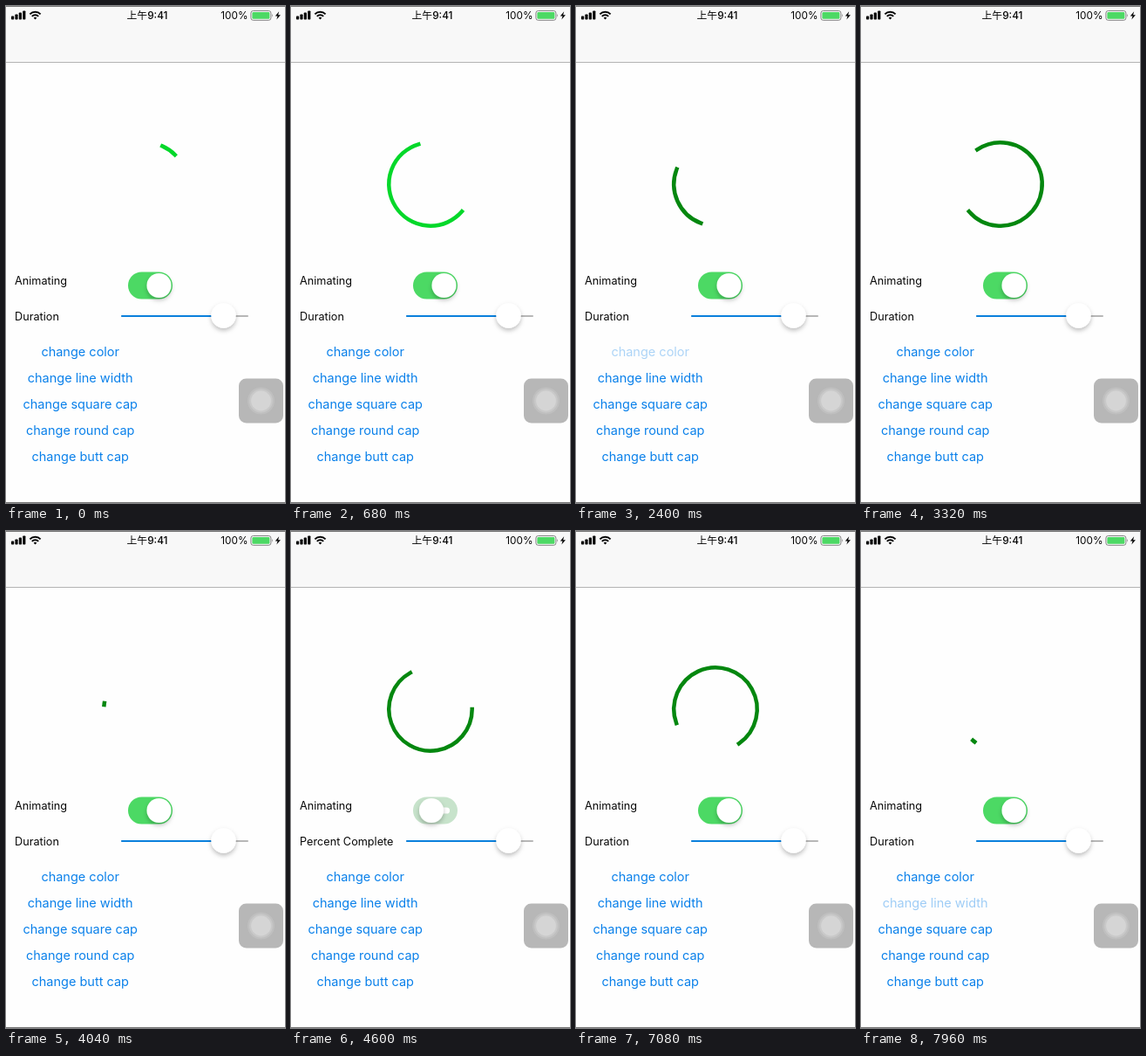
Animation of 320 by 569 pixels, one loop 8000 ms. Source, as an HTML page:

```html
<!DOCTYPE html>
<html lang="en">
<head>
<meta charset="utf-8">
<title>Spinner demo</title>
<style>
  html, body { margin: 0; width: 100%; height: 100%; overflow: hidden; background: #fff; }
  svg { display: block; width: 100vw; height: 100vh; }
  text { font-family: Inter, "Noto Sans CJK SC", "Noto Sans CJK", sans-serif; }
  .status { font-size: 11.8px; fill: #050505; }
  .label { font-size: 12.7px; fill: #080808; }
  .button { font-size: 14.5px; fill: #0a80ea; text-anchor: middle; }
</style>
</head>
<body>
<svg viewBox="0 0 320 569" xmlns="http://www.w3.org/2000/svg">
  <defs>
    <filter id="shadow" x="-50%" y="-50%" width="200%" height="200%">
      <feDropShadow dx="0" dy="2.8" stdDeviation="2.5" flood-color="#000" flood-opacity=".25"/>
    </filter>
  </defs>
  <rect width="320" height="569" fill="#fefefe"/>
  <rect width="320" height="64" fill="#f8f8f8"/>
  <rect y="64" width="320" height="1" fill="#b4b4b4"/>
  <path d="M0 .5H320M0 568.5H320" stroke="#777"/>

  <g id="signal" fill="#050505"></g>
  <g fill="none" stroke="#050505" stroke-width="2">
    <path d="M27.4 9.4a8.6 8.6 0 0 1 12.2 0M29.8 11.9a5.2 5.2 0 0 1 7.4 0"/>
    <path d="M33.5 15.6l-1.9-2a2.7 2.7 0 0 1 3.8 0z" fill="#050505" stroke="none"/>
  </g>
  <text class="status" x="162" y="15" text-anchor="middle" font-weight="500">上午9:41</text>
  <text class="status" x="277.5" y="15" text-anchor="end">100%</text>
  <rect x="280.9" y="5.5" width="23" height="10.8" rx="2.6" fill="none" stroke="#777" stroke-width=".9"/>
  <rect x="282.4" y="7" width="20" height="7.8" rx="1.4" fill="#4cd964"/>
  <path d="M305 9.1q1.6 1.8 0 3.6z" fill="#777"/>
  <path d="M313.2 6.2l-4.4 5.2h2.7l-1.1 4.2 4.5-5.4h-2.8z" fill="#050505"/>

  <path id="arc" fill="none" stroke-width="4.5" stroke-linecap="square"/>

  <text class="label" x="10" y="319">Animating</text>
  <text class="label" x="10" y="360" id="caption"></text>

  <rect id="track" x="140" y="304.5" width="51" height="31" rx="15.5"/>
  <rect id="pill" fill="#fff"/>
  <circle id="knob" cy="320" r="14" fill="#fff" filter="url(#shadow)"/>

  <rect x="132" y="354" width="146" height="2" rx="1" fill="#b7b7b7"/>
  <rect x="132" y="354" width="117" height="2" rx="1" fill="#0a80dc"/>
  <circle cx="249.5" cy="354.5" r="14.2" fill="#fff" filter="url(#shadow)"/>

  <g id="buttons"></g>

  <rect x="267" y="426.5" width="51" height="51" rx="8.5" fill="#b7b7b7"/>
  <g fill="#fff">
    <circle cx="292.5" cy="452" r="15.5" fill-opacity=".12"/>
    <circle cx="292.5" cy="452" r="13.4" fill-opacity=".16"/>
    <circle cx="292.5" cy="452" r="11.4" fill-opacity=".22"/>
  </g>
</svg>
<script>
const NS = 'http://www.w3.org/2000/svg';
const $ = id => document.getElementById(id);
const clamp = x => Math.min(1, Math.max(0, x));
const mix = (a, b, k) => a + (b - a) * k;

function add(parent, tag, attrs) {
  const el = document.createElementNS(NS, tag);
  set(el, attrs);
  return parent.appendChild(el);
}
function set(el, attrs) {
  for (const key in attrs) el.setAttribute(key, attrs[key]);
}

// cubic-bezier(.42, 0, .58, 1)
function ease(x) {
  let lo = 0, hi = 1;
  for (let i = 0; i < 24; i++) {
    const s = (lo + hi) / 2, r = 1 - s;
    if (1.26 * s * r * r + 1.74 * s * s * r + s * s * s < x) lo = s; else hi = s;
  }
  return lo * lo * (3 - 2 * lo);
}

const LOOP = 8000, PERIOD = 2.11, SPIN = 135 / PERIOD;
const OFF = 4410, PRESS = 5760, ON = 5905;
const RECOLOR = 2360, PERCENT = 0.669;
const CX = 160, CY = 204, RADIUS = 47.7;

for (let i = 0; i < 4; i++) {
  const h = 4 + 2 * i;
  add($('signal'), 'rect', { x: 6 + 4.4 * i, y: 15.5 - h, width: 3.2, height: h, rx: .8 });
}
const buttons = ['color', 'line width', 'square cap', 'round cap', 'butt cap'].map((name, i) => {
  const el = add($('buttons'), 'text', { class: 'button', x: 85.2, y: 401 + 30 * i });
  el.textContent = 'change ' + name;
  return el;
});

function drawArc(from, to, turn) {
  const point = k => {
    const a = (turn + 360 * k) * Math.PI / 180;
    return (CX + RADIUS * Math.cos(a)).toFixed(3) + ' ' + (CY + RADIUS * Math.sin(a)).toFixed(3);
  };
  to = Math.max(to, from + .0005);
  const large = to - from > .5 ? 1 : 0;
  set($('arc'), { d: `M${point(from)}A${RADIUS} ${RADIUS} 0 ${large} 1 ${point(to)}` });
}

// Grow for two thirds of the period, then the start catches up.
function spin(phase, turn) {
  const p = phase % PERIOD / PERIOD * 3;
  if (p < 2) {
    const e = ease(p / 2);
    drawArc(e / 4, e, turn);
  } else {
    drawArc(mix(.25, 1, ease(p - 2)), 1, turn);
  }
}

function drawSwitch(t) {
  let on = 1, tint = 1, size = 0;
  if (t >= OFF && t < PRESS) {
    const u = clamp((t - OFF) / 300);
    on = 1 - ease(u);
    tint = (1 - u) ** 1.6;
    size = u ** 3;
  } else if (t >= PRESS) {
    const u = clamp((t - ON) / 270);
    on = ease(u);
    tint = u ** 1.3;
    size = 1 - clamp((t - PRESS) / 420) ** 2;
  }
  const w = 48 * size, h = 28 * size;
  set($('track'), { fill: `rgb(${mix(229, 76, tint)},${mix(229, 217, tint)},${mix(229, 100, tint)})` });
  set($('pill'), { x: 179.5 - 14 * size - w / 2, y: 320 - h / 2, width: w, height: h, rx: h / 2 });
  set($('knob'), { cx: mix(155.5, 175.5, on) });
}

function dim(t, down, up) {
  if (t < down) return 1;
  return t < up ? mix(1, .2, clamp((t - down) / 80)) : mix(.2, 1, clamp((t - up) / 250));
}

function draw(t) {
  const stopped = t >= OFF && t < ON;
  if (stopped) drawArc(0, PERCENT, 0);
  else if (t < OFF) spin(t / 1000 + .275, t / 1000 * SPIN - 73.3);
  else spin((t - ON) / 1000, (t - ON) / 1000 * SPIN);
  set($('arc'), { stroke: t < RECOLOR ? '#04d82a' : '#04870f' });
  $('caption').textContent = stopped ? 'Percent Complete' : 'Duration';
  drawSwitch(t);
  set(buttons[0], { opacity: dim(t, RECOLOR - 100, RECOLOR) });
  set(buttons[1], { opacity: dim(t, 7900, LOOP) });
}

function tick() {
  draw(performance.now() % LOOP);
  requestAnimationFrame(tick);
}
tick();
</script>
</body>
</html>
```
